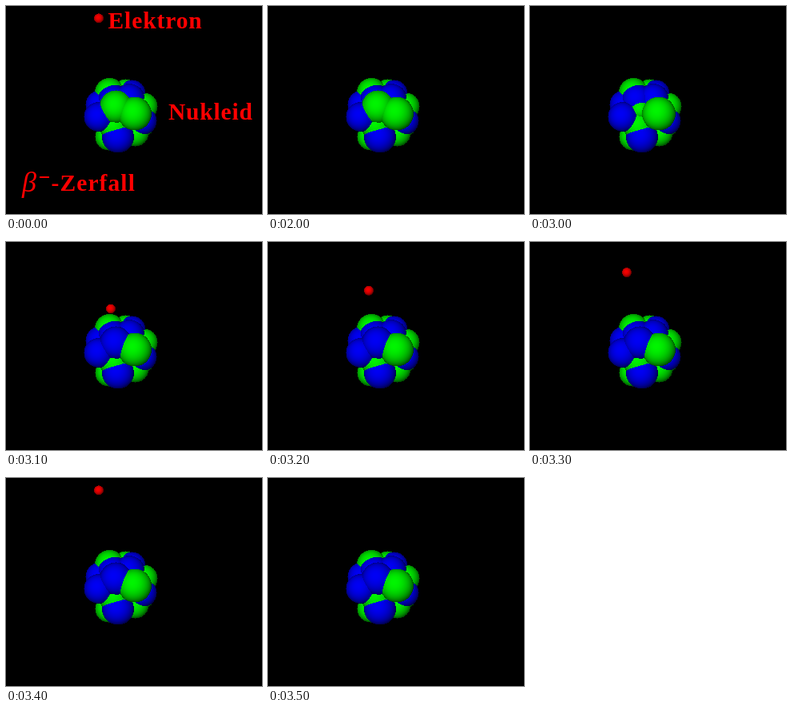
Recreate the animation shown at these times as an HTML page with a canvas. Size 320 px wide and 260 px high, loop 3.8 s.

```html
<!DOCTYPE html>
<html lang="de">
<head>
<meta charset="utf-8">
<title>Beta-Zerfall</title>
<style>
html, body { margin: 0; width: 100%; height: 100%; overflow: hidden; background: #000; }
canvas { display: block; }
</style>
</head>
<body>
<canvas id="stage" width="320" height="260"></canvas>
<script>
const W = 320, H = 260, LOOP = 3800;
const ctx = document.getElementById('stage').getContext('2d');
const RED = 0, GREEN = 1, BLUE = 2;
const LIGHT = [-0.16, -0.2, 0.967];

// Nucleons: x, y, depth, radius, colour channel
const nucleons = [
  [160.5, 134, 26, 21, GREEN],
  [115.5, 138, 17, 18.5, BLUE],
  [139.5, 163, 10, 20, BLUE],
  [135.5, 149, 9, 19.5, GREEN],
  [137, 128.5, 16, 12, GREEN],
  [129, 108, -1, 18.5, GREEN],
  [133, 116, 7, 19, BLUE],
  [117, 123, -2, 18, BLUE],
  [157, 109, -2, 17, BLUE],
  [154, 115, 8, 18.5, BLUE],
  [172, 125, -2, 17, GREEN],
  [170.5, 143, 4, 17.5, BLUE],
  [161, 158, -4, 17, GREEN],
  [169, 146, -8, 17, GREEN],
  [128, 163, -4, 17, GREEN],
  [149, 107, -8, 16, GREEN]
];
const decaying = channel => [137, 125.5, 22, 20.5, channel];

// Spheres intersect each other through a depth buffer.
function render(spheres) {
  const img = ctx.createImageData(W, H);
  const depth = new Float32Array(W * H).fill(-Infinity);
  for (let i = 3; i < img.data.length; i += 4) img.data[i] = 255;
  for (const [cx, cy, cz, r, channel] of spheres) {
    for (let y = Math.ceil(cy - r); y <= cy + r; y++) {
      for (let x = Math.ceil(cx - r); x <= cx + r; x++) {
        const dx = x - cx, dy = y - cy, d = r * r - dx * dx - dy * dy;
        if (d < 0) continue;
        const dz = Math.sqrt(d), i = y * W + x;
        if (cz + dz <= depth[i]) continue;
        depth[i] = cz + dz;
        const dot = (dx * LIGHT[0] + dy * LIGHT[1] + dz * LIGHT[2]) / r;
        const shade = 0.28 + 0.68 * Math.max(0, dot);
        img.data.fill(0, i * 4, i * 4 + 3);
        img.data[i * 4 + channel] = 255 * shade;
      }
    }
  }
  return img;
}

function write(text, x, y, font, spacing = 0) {
  ctx.font = font + ' "Liberation Serif", serif';
  ctx.letterSpacing = spacing + 'px';
  ctx.fillText(text, x, y);
}

function drawLabels() {
  const bold = 'bold 29.5px';
  ctx.fillStyle = '#f00';
  write('Elektron', 127.5, 27.5, bold, 0.9);
  write('Nukleid', 203, 142, bold, 0.8);
  write('β', 20, 232, 'italic 36px');
  ctx.fillRect(42, 213, 12, 2);
  write('-Zerfall', 56.5, 231, bold, 1.1);
}

function electron(step) {
  return [130.5 - 5 * step, 83 - 22.7 * step, 40, 6, RED];
}

function draw(key) {
  const spheres = nucleons.slice();
  if (key !== 0) spheres.push(decaying(key < 0 ? GREEN : BLUE));
  if (key === -2) spheres.push(electron(3));
  if (key > 0 && key < 5) spheres.push(electron(key - 1));
  ctx.putImageData(render(spheres), 0, 0);
  if (key === -2) drawLabels();
}

// -2: labelled, -1: at rest, 0: neutron gone, 1-4: electron leaving, 5: done
function phase(t) {
  if (t < 2000) return -2;
  if (t < 3000) return -1;
  return Math.min(5, Math.floor((t - 3000) / 100));
}

let shown;
const start = performance.now();
function tick() {
  const key = phase((performance.now() - start) % LOOP);
  if (key !== shown) draw(shown = key);
  requestAnimationFrame(tick);
}
tick();
</script>
</body>
</html>
```
